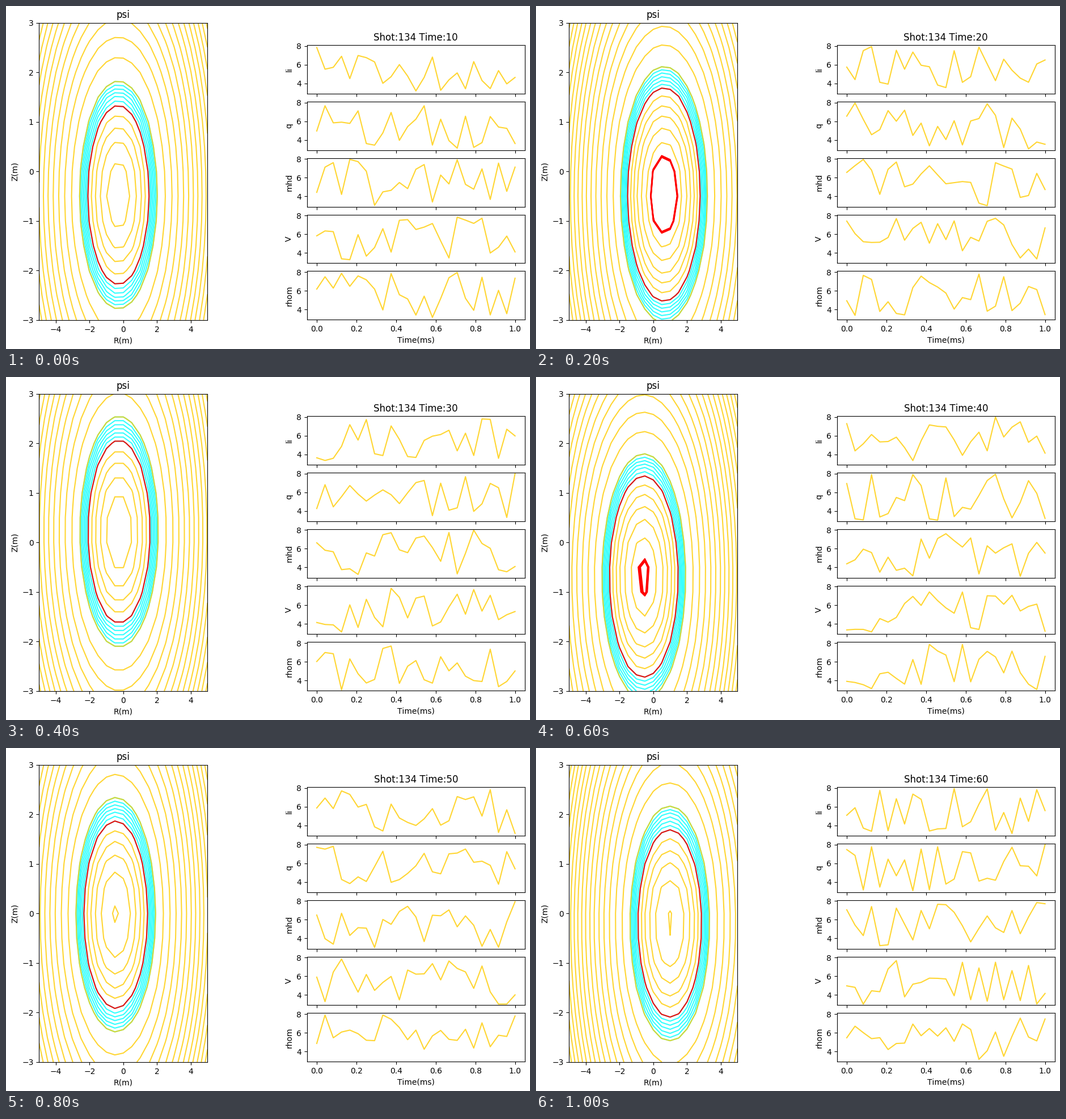
These frames come from a looping animation (924 px wide and 606 px high, 1200 ms). A matplotlib script:

```python
import matplotlib.pyplot as plt
import numpy as np
from matplotlib.animation import FuncAnimation

W, H, DPI = 924, 606, 100
GOLD, LCFS = "#ffcc00", "#ee0d0a"
ALPHA = 0.8
SIGNALS = ["li", "q", "mhd", "V", "rhom"]

# plasma centre (R, Z) and flux at the boundary for each time slice
SLICES = [
    (-0.29, -0.475, 3.32),
    (0.635, -0.465, 4.68),
    (-0.25, 0.215, 3.42),
    (-0.56, -0.69, 4.18),
    (-0.45, -0.025, 3.62),
    (0.98, -0.20, 3.62),
]

R, Z = np.meshgrid(np.linspace(-5, 5, 21), np.linspace(-3, 3, 13))
TIME = np.linspace(0, 1, 25)

# flux levels relative to the boundary
CORE = -0.707 * np.arange(5, 0, -1)
EDGE = np.linspace(0, 2.02, 7)
OUTER = 2.02 + 2.424 * np.arange(20)
AXIS = np.linspace(-4.04, -3.99, 6)

plt.rcParams["text.kerning_factor"] = 6
fig = plt.figure(figsize=(W / DPI, H / DPI), dpi=DPI)


def pixel_axes(left, top, width, height):
    return fig.add_axes([left / W, 1 - (top + height) / H, width / W, height / H])


flux_ax = pixel_axes(58.3, 29.5, 297, 525.4)
signal_axes = [pixel_axes(530.5, 69.05 + 99.85 * k, 384.6, 85.85) for k in range(5)]
signal_lines = []
for ax, name in zip(signal_axes, SIGNALS):
    line, = ax.plot(TIME, TIME, color=GOLD, alpha=ALPHA)
    signal_lines.append(line)
    ax.set(xlim=(-0.05, 1.05), ylim=(2.9, 8.1), yticks=[4, 6, 8], ylabel=name)
    ax.tick_params(labelbottom=ax is signal_axes[-1])
signal_axes[-1].set_xlabel("Time(ms)")


def draw_flux(r0, z0, boundary):
    psi = (R - r0) ** 2 + (Z - z0) ** 2 - boundary

    def contour(levels, color, alpha=ALPHA):
        visible = [v for v in levels if psi.min() < v < psi.max()]
        if visible:
            flux_ax.contour(R, Z, psi, levels=visible, colors=[color],
                            alpha=alpha, linestyles="solid")

    flux_ax.clear()
    contour(EDGE, "cyan")
    contour(CORE, GOLD)
    contour(OUTER, GOLD)
    contour([0], LCFS, 1)
    contour(AXIS, "red", 1)
    flux_ax.set(xlim=(-5, 5), ylim=(-3, 3), xticks=range(-4, 5, 2),
                yticks=range(-3, 4), xlabel="R(m)", ylabel="Z(m)", title="psi")


def update(i):
    draw_flux(*SLICES[i])
    rng = np.random.default_rng(134 + i)
    for line in signal_lines:
        line.set_ydata(rng.uniform(3, 8, TIME.size))
    signal_axes[0].set_title(f"Shot:134 Time:{10 * (i + 1)}")
    return []


anim = FuncAnimation(fig, update, frames=len(SLICES), interval=200,
                     repeat=True, repeat_delay=0)
plt.show()
```
